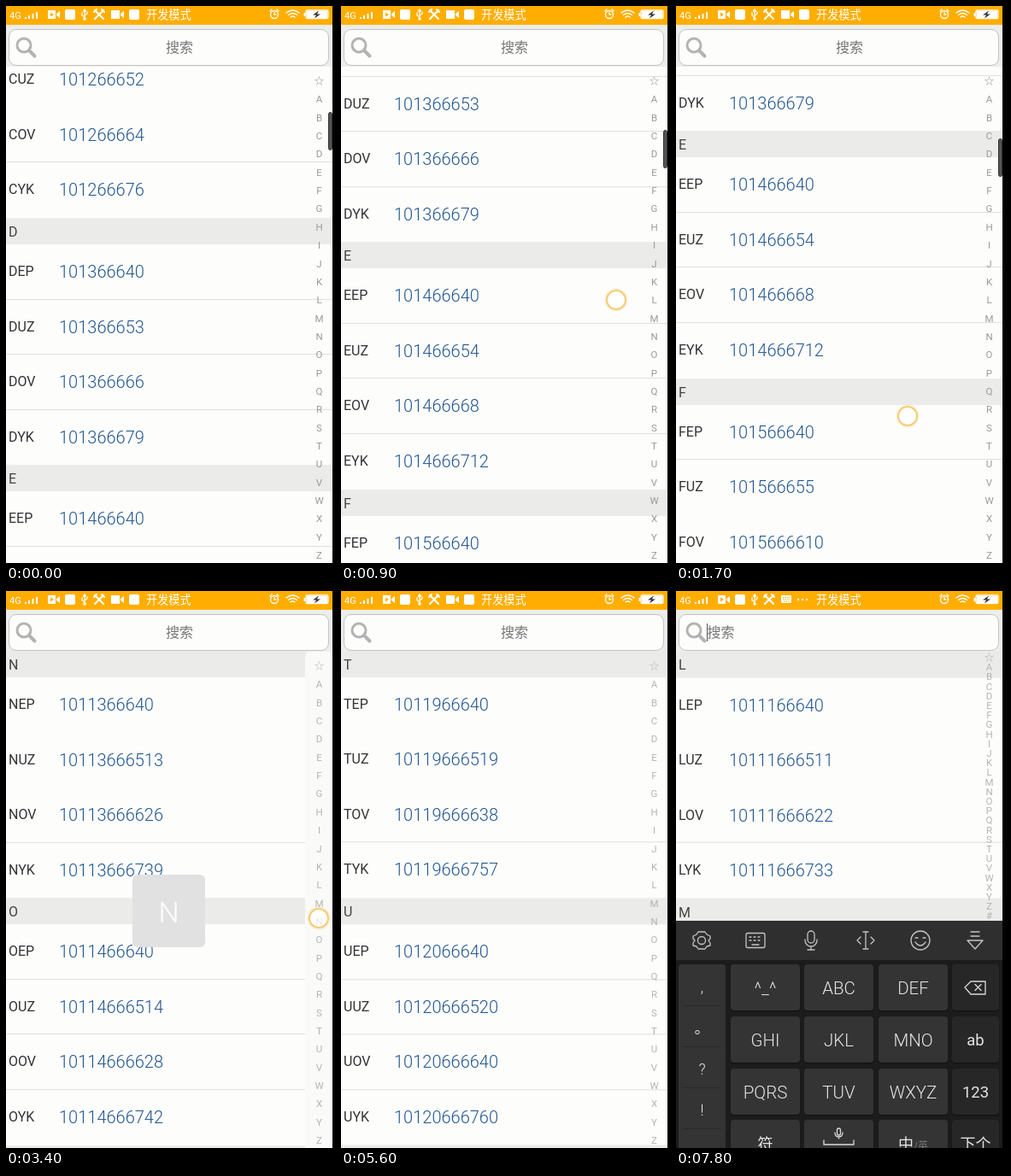
An HTML page for the animation above (8 s loop, 385 by 652 pixels).

```html
<!DOCTYPE html>
<html lang="zh">
<head>
<meta charset="utf-8">
<title>Contacts</title>
<style>
html, body { margin: 0; width: 100%; height: 100%; overflow: hidden; background: #000; }
body, svg text { font-family: Roboto, "Noto Sans CJK SC", "Noto Sans CJK", sans-serif; }
div, svg { position: absolute; box-sizing: border-box; }
#stage { width: 385px; height: 652px; overflow: hidden; background: #000; }
#screen { width: 382px; height: 652px; overflow: hidden; background: rgb(253, 253, 252); }
#list { left: 0; top: 0; width: 382px; will-change: transform; }
.head { width: 382px; height: 31.3px; padding-left: 3px; background: rgb(235, 235, 234); color: #444; font-size: 16px; line-height: 33px; }
.row { width: 382px; height: 64.5px; line-height: 64.5px; border-bottom: 1px solid rgb(222, 222, 221); }
.row.bare { border-color: transparent; }
.row b { position: absolute; left: 3px; font-weight: 400; font-size: 16px; color: #333; }
.row i { position: absolute; left: 62px; font-style: normal; font-weight: 300; font-size: 20px; color: #21568f; }
#panel { left: 350px; top: 70px; width: 32px; height: 600px; background: rgb(250, 250, 249); border-radius: 7px 0 0 0; }
#index div { left: 352px; width: 29px; height: 12px; line-height: 12px; font-size: 11.5px; text-align: center; }
#thumb { left: 377px; width: 5px; height: 45px; border-radius: 3px; background: #555; border: 1px solid #333; }
#toast { left: 148px; top: 332px; width: 85px; height: 85px; border-radius: 6px; background: rgba(224, 224, 224, .96); color: #fff; font-size: 34px; font-weight: 300; line-height: 89px; text-align: center; }
#ring { left: -12px; top: -12px; width: 24px; height: 24px; border-radius: 50%; border: 2px solid #f3cd78; background: rgba(255, 255, 255, .69); box-shadow: 0 0 3px #f6d27e; }
#bar { width: 382px; height: 71px; background: rgb(237, 237, 236); }
#box { left: 3px; top: 27px; width: 375px; height: 43px; border: 1.5px solid #c3c3c3; border-radius: 9px; background: rgb(253, 253, 252); }
#hint { top: 37px; line-height: 24px; font-size: 16px; color: #777; }
#caret { left: 36px; top: 38px; width: 1px; height: 21px; background: #555; }
#keys { top: 386px; width: 382px; height: 266px; overflow: hidden; background: #1c1c1c; color: #e4e4e4; }
#tools { width: 382px; height: 46px; background: #2f2f2f; }
.key { border-radius: 4px; background: #343434; box-shadow: 0 1px 1px #111; text-align: center; font-weight: 300; }
.key.dark { background: #272727; }
.line { fill: none; stroke-width: 1.3; stroke-linecap: round; stroke-linejoin: round; }
</style>
</head>
<body>
<div id="stage"><div id="screen">
  <div id="list"></div>
  <div id="panel"></div>
  <div id="index"></div>
  <div id="thumb"></div>
  <div id="bar"></div>
  <div id="box"></div>
  <div id="hint">搜索</div>
  <div id="caret"></div>
  <svg width="382" height="71" fill="#fff">
    <g fill="none" stroke="#b3b3b3" stroke-linecap="round"><circle cx="21" cy="46" r="8" stroke-width="3"/><path d="M27.5 52.5l6 6" stroke-width="4"/></g>
    <path fill="#ffae00" d="M0 0h382v22H0z"/>
    <text x="4" y="15" font-size="11">4G</text>
    <path d="M22 13h2v2h-2zM26 11h2v4h-2zM30.500 9h2v6h-2zM35 7h2v8h-2z"/>
    <path d="M49 5h9v10h-9zM59 9l4-3v8l-4-3z"/><path fill="#ffae00" d="M52 7.500l4 2.500-4 2.500z"/>
    <rect x="69" y="4" width="12" height="12" rx="2"/>
    <g class="line" stroke="#fff"><path d="M92 15V4l-1.500 2h3L92 4M92 13l-3-2V8M92 11l3-2V7"/><path d="M104 5l10 10M114 5l-10 10" stroke-width="2.200"/><path d="M103 7l3-3M112 4l3 3" stroke-width="2"/></g>
    <circle cx="92" cy="15" r="1.800"/>
    <g id="calm"><path d="M123 5h10v10h-10zM134 9l4-3v8l-4-3z"/><rect x="144" y="4" width="12" height="12" rx="2"/></g>
    <g id="busy"><rect x="123" y="5" width="12" height="9" rx="1"/><path stroke="#ffae00" stroke-dasharray="1.500 1" d="M125 7.500h8M125 9.700h8M126 12h6"/><circle cx="143" cy="10" r="1.200"/><circle cx="148" cy="10" r="1.200"/><circle cx="153" cy="10" r="1.200"/></g>
    <text x="164" y="14.500" font-size="13.200">开发模式</text>
    <g class="line" stroke="#fff"><circle cx="314" cy="10" r="4.500"/><path d="M314 7.500V10h2M309 6l2-2M319 6l-2-2M328 8q7.500-6 15 0M330.500 10.500q5-4 10 0M333 13q2.500-2 5 0"/><rect x="351" y="5" width="26" height="9.500" rx="1.500"/></g>
    <path d="M352 6h24v8h-24zM348.500 8h2v4h-2z"/><path fill="#333" d="M366 5.500l-7 5h4l-2 4 7-5h-4z"/>
  </svg>
  <div id="keys">
    <div id="tools"></div>
    <svg width="382" height="266" class="line" stroke="#c4c4c4">
      <g transform="translate(30 23)"><circle r="4.500"/><path d="M-4-10h8l2 3 4 2v3l-2 2 2 3v3l-4 1-2 3h-8l-2-3-4-1v-3l2-3-2-2v-3l4-2z"/></g>
      <g transform="translate(93 23)"><rect x="-11" y="-8.500" width="22" height="17" rx="2"/><path stroke-dasharray="2 3" d="M-7-4H8M-7 0H8"/><path d="M-4 5h8"/></g>
      <g transform="translate(158 23)"><rect x="-4" y="-11" width="8" height="14" rx="4"/><path d="M-7-1v1a7 7 0 0 0 14 0v-1M0 7v4M-4 11h8"/></g>
      <g transform="translate(222 23)"><path d="M-3-10h6M0-10v20M-3 10h6M-6-4l-4 4 4 4M6-4l4 4-4 4"/></g>
      <g transform="translate(286 23)"><circle r="11"/><path d="M-6 2q6 8 12 0M-6-3h3M3-3h3"/></g>
      <g transform="translate(350 23)"><path d="M-5-10h10M-5-5h10M-9 0H9L0 10z"/></g>
    </svg>
  </div>
  <div id="ring"></div>
  <div id="toast"></div>
</div></div>
<script>
const $ = id => document.getElementById(id);
const add = (parent, cls, html, style) => {
  const el = document.createElement('div');
  el.className = cls;
  el.innerHTML = html;
  Object.assign(el.style, style);
  parent.append(el);
  return el;
};
const box = (x, y, w, h) => ({ left: x + 'px', top: y + 'px', width: w + 'px', height: h + 'px', lineHeight: h + 'px' });
const show = (id, on) => { $(id).style.display = on ? '' : 'none'; };

const LETTERS = [...'ABCDEFGHIJKLMNOPQRSTUVWXYZ'];
const SECTION = 289.3, STEP = 21.35;
const ENDINGS = ['EP', 'UZ', 'OV', 'YK'];

LETTERS.forEach((c, i) => {
  const group = add($('list'), '', '', { top: i * SECTION + 'px' });
  add(group, 'head', c);
  ENDINGS.forEach((end, k) => {
    const faint = k === 3 || (i > 9 && i % 2 && k < 2) || ((i === 2 || i === 5) && k === 1);
    const phone = `101${i}666${k + 4}${k * i}`;
    add(group, faint ? 'row bare' : 'row', `<b>${c + end}</b><i>${phone}</i>`, { top: 31.3 + k * 64.5 + 'px' });
  });
});
const marks = ['☆', ...LETTERS, '#'].map(c => add($('index'), '', c));

// Keyboard
const COLS = [64, 150, 237, 323], ROWS = [51, 112, 173, 233];
const ICON = d => `<svg width="100%" height="100%" style="left:0;top:0" class="line" stroke="#d9d9d9"><path d="${d}"/></svg>`;
const CAPS = [
  ['^_^', 'ABC', 'DEF', ICON('M15 27l7-7h17v15H22zM27 23.5l7 7M34 23.500l-7 7')],
  ['GHI', 'JKL', 'MNO', 'ab'],
  ['PQRS', 'TUV', 'WXYZ', '123'],
  ['符', ICON('M23 24v5h35v-5M38.500 12a2 2 0 0 1 4 0v4a2 2 0 0 1-4 0zM36 15q0 5 4.500 5t4.500-5M40.500 20v2'), '中<small style="color:#777;font-size:12px">/英</small>', '下个']
];
const side = add($('keys'), 'key', '', box(3, 51, 55, 240));
[',', '。', '?', '!'].forEach((c, i) => {
  add(side, '', c, { ...box(0, 5 + i * 48, 55, 44), fontSize: '18px' });
  add(side, '', '', { ...box(5, 48 + i * 48, 45, 1), background: '#292929' });
});
CAPS.forEach((row, r) => row.forEach((c, i) => {
  const size = r === 3 ? 18 : i === 3 ? 18.5 : 20.5;
  add($('keys'), i === 3 ? 'key dark' : 'key', c,
    { ...box(COLS[i], ROWS[r], i === 3 ? 55 : 81, 54), lineHeight: '57px', fontSize: size + 'px', fontWeight: i === 3 || r === 3 ? 400 : 300 });
}));

// Rows of [time, value, ...]
const SCROLL = [[0, 248], [100, 222], [500, 73], [900, -13], [1200, -39], [1400, -39], [1700, -143]];
const TOUCHES = [
  [[100, 268, 590], [500, 302, 434], [900, 322, 344], [1300, 325, 318]],
  [[1500, 258, 550], [1700, 271, 480], [2000, 271, 480]],
  [[3000, 366, 345], [3400, 366, 383], [5300, 366, 514], [5500, 366, 514]],
  [[6400, 366, 344], [6500, 366, 344]],
  [[7500, 254, 40], [7600, 254, 40]]
];
const KEYS_Y = [[7500, 266], [7600, 130], [7700, 30], [7800, 0]];

function at(table, t, n = 1) {
  const j = table.findIndex(row => row[0] > t);
  if (j < 0) return table[table.length - 1][n];
  if (!j) return table[0][n];
  const a = table[j - 1], b = table[j];
  return a[n] + (b[n] - a[n]) * (t - a[0]) / (b[0] - a[0]);
}

function draw(t) {
  const touch = TOUCHES.find(p => t >= p[0][0] && t < p[p.length - 1][0]);
  show('ring', touch);
  if (touch) $('ring').style.transform = `translate(${at(touch, t)}px, ${at(touch, t, 2)}px)`;

  const jumped = t >= 3000;
  const letter = Math.round((at(TOUCHES[t < 6400 ? 2 : 3], t, 2) - 109) / STEP);
  const d = at(SCROLL, t);
  const top = jumped ? 70 - letter * SECTION : d - 3 * SECTION;
  $('list').style.transform = `translateY(${top}px)`;

  show('thumb', t < 2200);
  $('thumb').style.top = 124 + (248 - d) * 0.0805 + 'px';
  show('panel', jumped && t < 5500);
  show('toast', (jumped && t < 5600) || (t >= 6400 && t < 6500));
  $('toast').textContent = LETTERS[letter];

  const typing = t >= 7600, tight = t >= 7700;
  marks.forEach((m, i) => { m.style.top = (tight ? 72 + i * 11.2 : 82 + i * STEP) + 'px'; });
  $('index').style.color = jumped ? '#b4b4b4' : '#999';
  $('hint').style.left = typing ? '36.5px' : '187px';
  show('caret', typing);
  show('busy', typing);
  show('calm', !typing);
  show('keys', t >= 7500);
  $('keys').style.transform = `translateY(${at(KEYS_Y, t)}px)`;
}

const start = performance.now();
function tick() {
  const t = (performance.now() - start) % 8000;
  draw(Math.floor(t / 100) * 100);
  requestAnimationFrame(tick);
}
tick();
</script>
</body>
</html>
```
